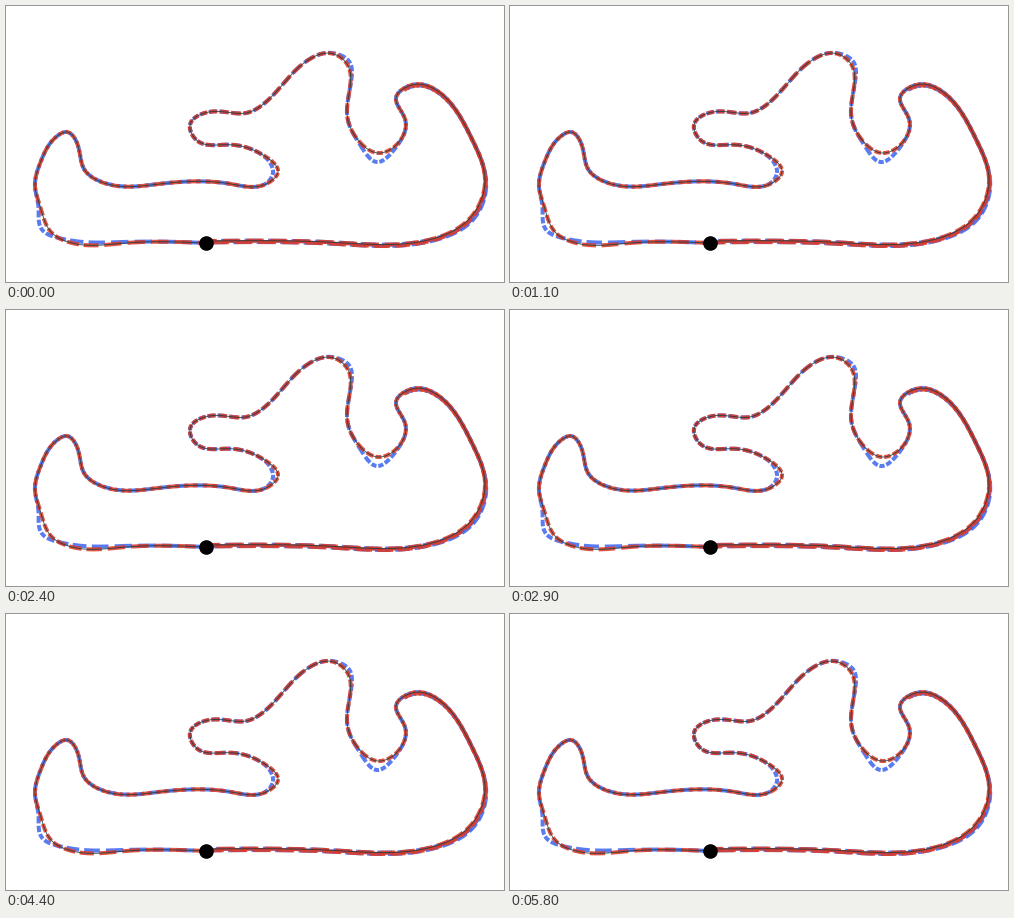
A matplotlib script that plays this animation: 498 px wide and 276 px high, repeating every 5.9 s.

```python
import numpy as np
import matplotlib.pyplot as plt
from matplotlib.animation import FuncAnimation
from matplotlib.collections import LineCollection

W, H, DPI = 498, 276, 100
FRAMES, STEP_MS = 59, 100
CYCLES = 7          # dash periods per loop
DUTY = 0.74
PX = 72 / DPI
OVERLAP = 0.69      # the last part of the lap is driven twice

KEYS = [
    (200, 237), (120, 237), (64, 236.5), (45, 226), (34, 200), (29, 180),
    (35, 155), (50, 131), (61, 126), (71, 137), (78, 163), (104, 178.7),
    (150, 178.3), (225, 178), (260, 178), (272, 166), (257, 149),
    (220, 138.7), (191, 134.5), (184, 119), (203, 106), (240, 107),
    (270, 86), (300, 55.5), (326, 47.5), (341, 58), (341, 107), (352, 134),
    (372, 147), (397, 130), (399, 113), (390, 92), (408, 78.5), (430, 84),
    (466, 133), (479, 175), (465, 211), (420, 234.5), (330, 236.5),
    (200, 235),
]

# Where the second driver runs off the line: center, shift, reach
DRIFTS = [
    ((42, 219), (-6, 3), 18), ((80, 237), (0, -3), 40),
    ((272, 166), (-5, 1), 15), ((341, 58), (2.5, -2), 15),
    ((372, 147), (-1, 9), 17), ((470, 205), (1.5, 1.5), 40),
]


def spline(points, n=3000):
    """Natural cubic spline through the points."""
    p = np.array(points, float)
    t = np.r_[0, np.cumsum(np.hypot(*np.diff(p, axis=0).T))]
    h = np.diff(t)
    slope = np.diff(p, axis=0) / h[:, None]
    a, rhs = np.eye(len(p)), np.zeros_like(p)
    for i in range(1, len(p) - 1):
        a[i, i - 1:i + 2] = h[i - 1], 2 * (h[i - 1] + h[i]), h[i]
        rhs[i] = 6 * (slope[i] - slope[i - 1])
    m = np.linalg.solve(a, rhs)

    u = np.linspace(0, t[-1], n)
    k = np.clip(np.searchsorted(t, u, "right") - 1, 0, len(h) - 1)
    hk, lo, hi = h[k][:, None], (u - t[k])[:, None], (t[k + 1] - u)[:, None]
    return ((m[k] * hi**3 + m[k + 1] * lo**3) / (6 * hk)
            + (p[k] / hk - m[k] * hk / 6) * hi
            + (p[k + 1] / hk - m[k + 1] * hk / 6) * lo)


def drift(xy):
    out = xy.copy()
    for center, shift, reach in DRIFTS:
        d2 = ((xy - center)**2).sum(axis=1)
        out += np.exp(-d2 / reach**2)[:, None] * shift
    return out


def lap_clock(xy, grip=4.0, low=7.0, top=23.5, accel=1.2, brake=4.0):
    """Time at each point; curvature, throttle and brakes limit the speed."""
    ds = np.hypot(*np.diff(xy, axis=0).T)
    s = np.r_[0, np.cumsum(ds)]
    d1 = np.gradient(xy, s, axis=0)
    d2 = np.gradient(d1, s, axis=0)
    bend = np.abs(d1[:, 0] * d2[:, 1] - d1[:, 1] * d2[:, 0])
    v = np.clip(np.sqrt(grip / (bend + 1e-6)), low, top)
    for i in range(1, len(v)):
        v[i] = min(v[i], np.sqrt(v[i - 1]**2 + 2 * accel * ds[i - 1]))
    for i in range(len(v) - 2, -1, -1):
        v[i] = min(v[i], np.sqrt(v[i + 1]**2 + 2 * brake * ds[i]))
    return np.r_[0, np.cumsum(ds / v[1:])]


class DashedLap:
    """Dashes of equal lap time that run along a racing line."""

    def __init__(self, xy, color, offset, z):
        self.xy, self.offset = xy, offset
        self.clock = lap_clock(xy)
        self.lines = LineCollection([], colors=color, alpha=0.87, zorder=z,
                                    linewidths=4 * PX, capstyle="butt")
        ax.add_collection(self.lines)

    def dashes(self, phase, begin, shift=(0, 0)):
        end = self.clock[-1]
        start = np.arange(np.floor(begin) - 1, end) + phase % 1
        start = start[(start + DUTY > begin) & (start < end)]
        t = start[:, None] + DUTY * np.linspace(0, 1, 12)
        t = np.clip(t, begin, end)
        return np.stack([np.interp(t, self.clock, self.xy[:, j]) + shift[j]
                         for j in (0, 1)], axis=-1)

    def move(self, phase):
        phase += self.offset
        again = self.clock[int(OVERLAP * len(self.clock))]
        self.lines.set_segments([*self.dashes(phase, 0),
                                 *self.dashes(phase + 0.5, again, (0.4, 1.4))])


fig = plt.figure(figsize=(W / DPI, H / DPI), dpi=DPI, facecolor="white")
ax = fig.add_axes([0, 0, 1, 1])
ax.set(xlim=(0, W), ylim=(H, 0))
ax.axis("off")

track = spline(KEYS)
laps = [DashedLap(drift(track), "#4169f0", 0.3, 1),
        DashedLap(track, "#dc3a28", 0.6, 2)]
ax.plot(*track.T, color="#1c3c3c", alpha=0.8, lw=PX, zorder=3)
ax.plot(200.3, 236.7, "o", color="black", ms=14.6 * PX, mew=0, zorder=4)


def draw(i):
    for lap in laps:
        lap.move(CYCLES * i / FRAMES)
    return [lap.lines for lap in laps]


anim = FuncAnimation(fig, draw, frames=FRAMES, interval=STEP_MS,
                     repeat=True, repeat_delay=0)
plt.show()
```
